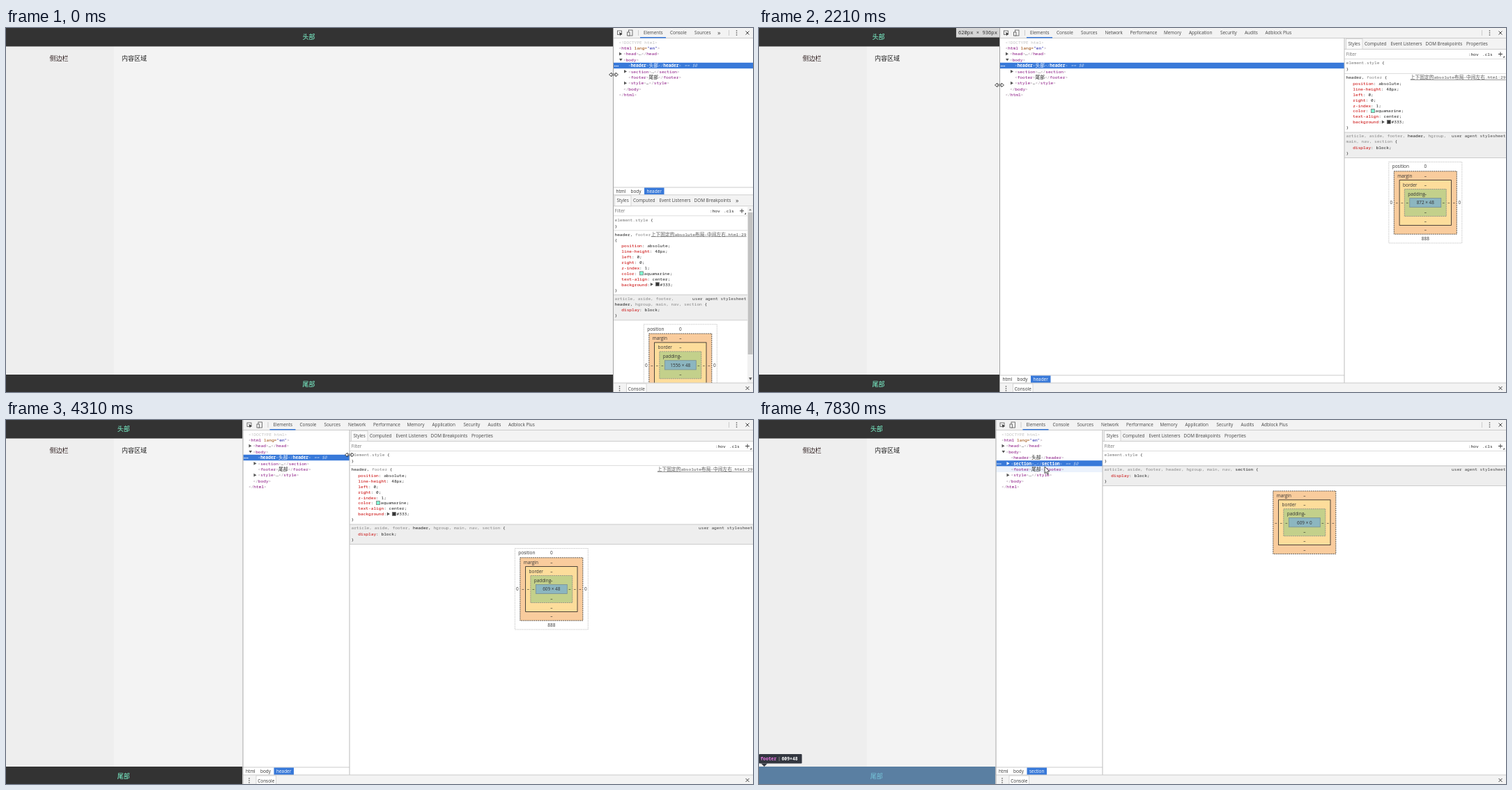
Recreate the animation shown at these times as an HTML page with a canvas. Size 1072x523 px, loop 8 s.

```html
<!DOCTYPE html>
<html lang="zh">
<head>
<meta charset="utf-8">
<title>DevTools resize</title>
<style>
html, body { margin: 0; width: 100%; height: 100%; overflow: hidden; background: #fff; }
canvas { display: block; width: 1072px; height: 523px; }
</style>
</head>
<body>
<canvas id="stage"></canvas>
<script>
const W = 1072, H = 523, LOOP = 8000;
const canvas = document.getElementById('stage');
const c = canvas.getContext('2d');
const ratio = window.devicePixelRatio || 1;
canvas.width = W * ratio;
canvas.height = H * ratio;

const MONO = '"Noto Sans Mono", "DejaVu Sans Mono", monospace';
const UI = '"Open Sans", "Noto Sans", sans-serif';
const CJK = '"Noto Sans CJK SC", "Noto Sans CJK", sans-serif';
const BLUE = '#3879d9', INK = '#222', GRAY = '#888', LINE = '#ccc', BAR = '#f3f3f3';
const ADVANCE = 3.69;

// Pointer: time, x, y
const POINTER = [
  [885, 872, 67], [1140, 842, 68], [1270, 756, 71], [1540, 495, 76], [1800, 400, 80],
  [2100, 345, 82], [2220, 345, 82], [2400, 339.5, 82], [2590, 339.5, 82], [2900, 470, 72],
  [3150, 680, 60], [3370, 838, 50], [3440, 839, 50], [3700, 839, 50], [3920, 575, 50],
  [4050, 520, 50], [4300, 493, 50], [4610, 493, 50], [4800, 512, 62], [5000, 500, 78],
  [5240, 505, 80], [5410, 539, 77], [5470, 539, 77], [5740, 587, 77], [5880, 587, 77],
  [6200, 480, 72], [6400, 420, 66], [6560, 407, 60], [6790, 407, 60], [7100, 500, 70],
  [7400, 430, 70], [7600, 416, 67], [7680, 416, 67], [7830, 410, 67]];
const DOCK = [[885, 871], [1270, 842], [1670, 492], [1930, 400], [2200, 345], [2260, 345], [2500, 339.5]];
const SPLIT = [[3710, 840], [3920, 588.5], [4060, 525], [4310, 493]];

const PANELS = [['Elements', 44], ['Console', 82], ['Sources', 117], ['Network', 151.5],
  ['Performance', 187.5], ['Memory', 236], ['Application', 272], ['Security', 317],
  ['Audits', 352], ['Adblock Plus', 381.5]];
const SIDE_TABS = [['Styles', 5.5], ['Computed', 29], ['Event Listeners', 66.5],
  ['DOM Breakpoints', 116.5], ['Properties', 175]];
// Tree rows: indent, fold arrow, markup
const TREE = [[8.5, '', '<!DOCTYPE html>'], [8.5, '', '<html lang="en">'], [15, 'right', '<head>…</head>'],
  [15, 'down', '<body>'], [22, '', '<header>头部</header>'], [22, 'right', '<section>…</section>'],
  [22, '', '<footer>尾部</footer>'], [22, 'right', '<style>…</style>'], [15, '', '</body>'], [8.5, '', '</html>']];
const RULES = ['position: absolute', 'line-height: 48px', 'left: 0', 'right: 0', 'z-index: 1',
  'color: aquamarine', 'text-align: center', 'background: #333'];
const SECTIONING = 'article, aside, footer, header, hgroup, main, nav, section';

function track(keys, t) {
  const next = keys.findIndex(k => k[0] > t);
  if (next === 0) return keys[0].slice(1);
  if (next < 0) return keys[keys.length - 1].slice(1);
  const a = keys[next - 1], b = keys[next], p = (t - a[0]) / (b[0] - a[0]);
  return a.slice(1).map((v, i) => v + (b[i + 1] - v) * p);
}

function rect(x, y, w, h, color) { c.fillStyle = color; c.fillRect(x, y, w, h); }
function hline(x, y, x2, color = LINE) { rect(x, y, x2 - x, 1, color); }
function vline(x, y, y2, color = LINE) { rect(x, y, 1, y2 - y, color); }

function frame(x, y, w, h, fill, stroke, dash = []) {
  if (fill) rect(x, y, w, h, fill);
  c.strokeStyle = stroke;
  c.lineWidth = 0.8;
  c.setLineDash(dash);
  c.strokeRect(x, y, w, h);
  c.setLineDash([]);
}

function poly(points, fill, stroke) {
  c.beginPath();
  points.forEach(([x, y]) => c.lineTo(x, y));
  c.closePath();
  if (fill) { c.fillStyle = fill; c.fill(); }
  if (stroke) { c.strokeStyle = stroke; c.lineWidth = 0.8; c.stroke(); }
}

function label(text, x, y, color = '#333', font = `6.4px ${UI}`, align = 'left') {
  c.font = font;
  c.textAlign = align;
  c.fillStyle = color;
  c.fillText(text, x, y + (font.startsWith('9') ? 3.2 : 2.3));
}

// Code text with wider Chinese glyphs; returns the end position.
function code(text, x, y, color = INK, bold = false, size = 6.15) {
  c.textAlign = 'left';
  c.fillStyle = color;
  for (const run of text.match(/[\u4e00-\u9fff]+|[^\u4e00-\u9fff]+/g)) {
    c.font = /[\u4e00-\u9fff]/.test(run) ? `6.72px ${CJK}` : `${bold ? 'bold ' : ''}${size}px ${MONO}`;
    c.fillText(run, x, y + 2.2);
    x += c.measureText(run).width;
  }
  return x;
}

function triangle(x, y, dir, color = '#555') {
  poly(dir === 'right' ? [[x, y - 2.4], [x + 4, y], [x, y + 2.4]]
    : dir === 'up' ? [[x, y + 1.2], [x + 4, y + 1.2], [x + 2, y - 1.2]]
    : [[x, y - 1.7], [x + 4.6, y - 1.7], [x + 2.3, y + 2]], color);
}

function dots(x, y, color = '#555') {
  for (const d of [-3, 0, 3]) rect(x - 0.7, y + d - 0.7, 1.4, 1.4, color);
}

function cross(x, y) {
  c.strokeStyle = '#444';
  c.lineWidth = 1;
  c.beginPath();
  c.moveTo(x - 2.5, y - 2.5); c.lineTo(x + 2.5, y + 2.5);
  c.moveTo(x + 2.5, y - 2.5); c.lineTo(x - 2.5, y + 2.5);
  c.stroke();
}

function drawPage(dock, hover) {
  const centered = (text, x, y, color) => label(text, x, y, color, `9px ${CJK}`, 'center');
  const mid = dock / 2 - 1, overlay = 'rgba(111,168,220,.66)';
  rect(0, 0, dock, H, '#f3f3f3');
  rect(0, 26, 154.5, 472, '#eee');
  centered('侧边栏', 76, 44, '#302020');
  label('内容区域', 166, 44, INK, `9px ${CJK}`);
  rect(0, 0, dock, 26.5, '#333');
  rect(0, 498, dock, 25, '#333');
  centered('头部', mid, 13, '#7fffd4');
  centered('尾部', mid, 512, '#7fffd4');
  if (hover === 'header') rect(0, 0, dock, 26.5, overlay);
  if (hover === 'footer') rect(0, 498, dock, 25, overlay);
  if (hover) drawNodeTip(hover);
}

function drawNodeTip(name) {
  const top = { header: 31, section: 4, footer: 480 }[name];
  const size = name === 'section' ? '609×0' : '609×48';
  const nameEnd = 2 + name.length * 3.84, bg = '#333740';
  const width = nameEnd + 13.5 + size.length * 3.84;
  c.fillStyle = bg;
  c.beginPath();
  c.roundRect(0, top, width, 13.5, 1);
  c.fill();
  if (name === 'footer') poly([[3, top + 13.5], [12, top + 13.5], [7.5, top + 18]], bg);
  else {
    poly([[3, top], [12, top], [7.5, top - 4]], bg);
    if (name === 'section') frame(0, top, width, 13.5, null, '#5a6472');
  }
  code(name, 2, top + 7, '#ee78e6', true, 6.4);
  vline(nameEnd + 3.5, top + 4, top + 10, '#888');
  code(size, nameEnd + 7.5, top + 7, '#fff', true, 6.4);
}

function drawSizeTip(dock) {
  const text = `${Math.round(609 + 1.78 * (dock - 339))}px × 936px`;
  c.font = `7.2px ${MONO}`;
  const width = c.measureText(text).width + 6;
  rect(dock - width, 0, width, 13.5, 'rgba(255,255,255,.8)');
  label(text, dock - width + 3, 7, '#333', `7.2px ${MONO}`);
}

function drawToolbar(dock) {
  rect(dock, 0, W - dock, 14, BAR);
  hline(dock, 14, W);
  frame(dock + 6.5, 4, 6, 5.5, null, '#555');
  poly([[dock + 9, 6], [dock + 13.5, 8.5], [dock + 11.5, 9], [dock + 10.5, 11.5]], '#333');
  frame(dock + 22.5, 3, 5.5, 8, null, '#555');
  frame(dock + 20.5, 6, 3.5, 5, BAR, '#555');
  vline(dock + 36, 3, 11);
  const room = W - 34 - dock;
  for (const [name, x] of PANELS) {
    c.font = `6.4px ${UI}`;
    if (x + c.measureText(name).width + 24 > room) {
      label('»', dock + x - 1.5, 6.5, '#444', `9px ${UI}`);
      break;
    }
    label(name, dock + x, 7, '#444');
  }
  rect(dock + 39, 13, 37, 1.5, BLUE);
  vline(1037, 3, 11);
  dots(1048.5, 7);
  cross(1064, 7);
}

function drawMarkup(markup, x, y, selected) {
  if (markup.startsWith('<!')) return code(markup, x, y, '#c0c0c0');
  const bracket = selected ? '#a9c8f2' : '#a894a6', pick = color => selected ? '#fff' : color;
  for (const token of markup.match(/<\/?\w+|>| \w+=|"\w+"|[^<>]+/g)) {
    if (token[0] === '<') {
      const [, open, name] = token.match(/(<\/?)(\w+)/);
      x = code(open, x, y, bracket);
      x = code(name, x, y, pick('#881280'), selected);
    } else if (token === '>') x = code(token, x, y, bracket);
    else x = code(token, x, y, pick(token[0] === ' ' ? '#994500' : token[0] === '"' ? '#1a1aa6' : INK));
  }
  return x;
}

function drawTree(dock, right, selected, focused, hoverRow) {
  TREE.forEach(([indent, fold, markup], i) => {
    const y = 20.4 + i * 8.4, current = i === selected, lit = current && focused;
    if (current) rect(dock + 1, y - 4.2, right - dock - 1, 8.4, focused ? BLUE : '#d4d4d4');
    else if (i === hoverRow) rect(dock + 1, y - 4.2, right - dock - 1, 8.4, '#ebf2fc');
    if (fold) triangle(dock + indent - 6, y, fold, lit ? '#fff' : '#555');
    const end = drawMarkup(markup, dock + indent, y, lit);
    if (!current) return;
    c.font = `italic 6.15px ${MONO}`;
    c.fillStyle = lit ? '#b5cdf0' : '#888';
    c.fillText('== $0', end + 4.5, y + 2.2);
    for (const d of [2, 4.3, 6.6]) rect(dock + d, y, 1.3, 1.3, lit ? '#fff' : '#666');
  });
}

function drawCrumbs(dock, right, y, name) {
  hline(dock, y - 1, right);
  label('html', dock + 4.5, y + 5.5);
  label('body', dock + 25.5, y + 5.5);
  rect(dock + 45, y, 28.5, 10.5, BLUE);
  label(name, dock + 59.2, y + 5.5, '#fff', `6.4px ${UI}`, 'center');
}

// Selector list whose first line leaves room for the text on the right.
function drawSelector(text, active, x, y, limit) {
  let cx = x;
  for (const word of `${text} {`.split(' ')) {
    if (cx + word.length * ADVANCE > limit) { cx = x; y += 8; limit = W; }
    const strong = word === '{' || word.replace(',', '') === active;
    cx = code(word, cx, y, strong ? INK : GRAY) + ADVANCE;
  }
  return y;
}

function drawProperty(text, x, y) {
  const [name, value] = text.split(': ');
  let end = code(name, x, y, '#c80000');
  end = code(':', end, y);
  if (name === 'background') { triangle(end + 1, y, 'right'); end += 4.5; }
  if (/color|background/.test(name)) {
    frame(end + 4, y - 2.6, 5, 5, name === 'color' ? '#7fffd4' : '#333', '#777');
    end += 6.5;
  }
  code(`${value};`, end + ADVANCE, y);
}

function drawCheckbox(x, y) {
  frame(x, y - 2.8, 5.6, 5.6, '#fff', '#888');
  c.strokeStyle = '#222';
  c.lineWidth = 1.2;
  c.beginPath();
  c.moveTo(x + 1, y); c.lineTo(x + 2.3, y + 1.6); c.lineTo(x + 4.8, y - 1.7);
  c.stroke();
}

function drawBoxModel(mid, top, size, positioned) {
  const LAYERS = [['margin', 45, 45.2, '#f9cc9d', '#333', [2, 1]], ['border', 37.2, 32.4, '#fddd9b', '#222', []],
    ['padding', 30, 19.5, '#c3d08b', '#888', [2, 1]]];
  const cy = top + 45.2 + (positioned ? 13.3 : 0);
  const dash = (x, y) => label('–', x, y, '#222', `6.4px ${UI}`, 'center');
  if (positioned) {
    frame(mid - 52.5, top, 105, 116.5, '#fff', '#bbb', [1.5, 1]);
    label('position', mid - 47.5, cy - 52);
    for (const [text, dx, dy] of [['0', 0, -52], ['0', -49, 0], ['0', 49, 0], ['888', 0, 52]])
      label(text, mid + dx, cy + dy, '#333', `6.4px ${UI}`, 'center');
  }
  LAYERS.forEach(([name, w, h, fill, stroke, pattern]) => {
    frame(mid - w, cy - h, w * 2, h * 2, fill, stroke, pattern);
    label(name, mid - w + 5, cy - h + 7);
    dash(mid, cy - h + 7);
    dash(mid, cy + h - 6.2);
  });
  frame(mid - 22.5, cy - 6.6, 45, 13.2, '#8cb6c0', '#7a8f94');
  for (const dx of [26, 33.5, 41]) { dash(mid - dx, cy); dash(mid + dx, cy); }
  label(size, mid, cy, '#333', `6.4px ${UI}`, 'center');
}

function drawStyles(x, narrow, section, hovered, size) {
  const dy = narrow ? 225.3 : 0, right = narrow ? 1064 : W;
  const linkEnd = right - (narrow ? 1.5 : 0.5);
  rect(x, 14 + dy, W - x, H - 14 - dy, '#fff');
  rect(x, 15 + dy, W - x, 15, BAR);
  hline(x, 14 + dy, W);
  hline(x, 30 + dy, W);
  frame(x + 2.5, 15.5 + dy, 23.5, 15, '#fafafa', LINE);
  for (const [name, tx] of SIDE_TABS) {
    if (name === 'Properties' && W - x < 222) label('»', x + 176, 22 + dy, '#444', `9px ${UI}`);
    else label(name, x + tx, 22.8 + dy, '#444');
  }
  label('Filter', x + 2.5, 37.6 + dy, '#777');
  code(':hov', right - 54, 37.6 + dy);
  code('.cls', right - 34, 37.6 + dy);
  rect(right - 11, 37 + dy, 6, 1, '#444');
  rect(right - 8.5, 34.5 + dy, 1, 6, '#444');
  poly([[right - 2, 40 + dy], [right - 2, 42.5 + dy], [right - 4.5, 42.5 + dy]], '#444');
  hline(x, 44 + dy, right, '#ddd');

  code('{', code('element.style ', x + 2.5, 50.2 + dy, '#777'), 50.2 + dy);
  code('}', x + 2.5, 59.2 + dy);
  hline(x, 65 + dy, right, '#ddd');
  let y = 71 + dy;
  if (!section) {
    const link = '上下固定的absolute布局-中间左右.html:29';
    const linkX = linkEnd - 11 * 6.72 - 17 * ADVANCE;
    code(link, linkX, y, '#555');
    rect(linkX, y + 3.2, linkEnd - linkX, 0.6, '#555');
    y = drawSelector('header, footer', 'header', x + 2.5, y, linkX) + 0.8;
    for (const rule of RULES) {
      y += 7.9;
      drawProperty(rule, x + 12.3, y);
      if (hovered) drawCheckbox(x + 3, y);
    }
    y += 8;
    code('}', x + 2.5, y);
    if (hovered) dots(1064.5, y - 1);
    y += 12;
  }
  const agentX = linkEnd - 21 * ADVANCE;
  const wraps = x + 2.5 + (SECTIONING.length + 2) * ADVANCE > agentX;
  const bottom = y + (wraps ? 31 : 23);
  rect(x, y - 5, right - x, bottom - y + 5, '#eee');
  hline(x, y - 5.5, right, LINE);
  code('user agent stylesheet', agentX, y, '#444');
  y = drawSelector(SECTIONING, section ? 'section' : 'header', x + 2.5, y, agentX) + 8.5;
  drawProperty('display: block', x + 12.3, y);
  code('}', x + 2.5, y + 8.2);
  hline(x, bottom, right);
  drawBoxModel((x + right) / 2 + 0.3, bottom + (section ? 8 : 6.5), size, !section);

  if (narrow) {
    rect(1064, 256, 8, 254, '#f1f1f1');
    rect(1064.7, 265, 6.8, 204, '#c1c1c1');
    triangle(1066, 261, 'up', '#888');
    triangle(1066, 504, 'down', '#555');
  }
}

function drawDrawer(dock) {
  rect(dock, 510, W - dock, 13, BAR);
  hline(dock, 509.5, W);
  dots(dock + 9.5, 518);
  frame(dock + 19.5, 511, 28.5, 14, '#fff', LINE);
  label('Console', dock + 21.8, 518.3);
  cross(1064, 517.5);
}

function drawPointer(x, y, resizing) {
  const half = [[-6.5, 0], [-3, -2.8], [-3, -0.9], [3, -0.9], [3, -2.8], [6.5, 0]];
  const shape = resizing
    ? [...half, ...half.slice(1, 5).reverse().map(([px, py]) => [px, -py])]
    : [[0, 0], [0, 9.5], [2.2, 7.5], [3.8, 11], [5.4, 10.3], [3.9, 6.9], [6.8, 6.7]];
  poly(shape.map(([px, py]) => [x + px, y + py]), '#fff', '#222');
}

function draw(t) {
  const [px, py] = track(POINTER, t), [dock] = track(DOCK, t), [split] = track(SPLIT, t);
  const narrow = dock > 690, section = t >= 6480;
  const resizing = t < 2600 || (t >= 3370 && t < 4620);
  const treeRight = narrow ? W : split;
  const row = !resizing && px > dock + 2 && px < treeRight ? Math.floor((py - 16.2) / 8.4) : -1;
  const hover = { 4: 'header', 5: 'section', 6: 'footer' }[row];
  const hoverRule = !section && !resizing && px > split && py > 66 && py < 150;
  const size = section ? '609 × 0' : `${t < 1600 ? 1556 : t < 2450 ? 872 : 609} × 48`;

  c.setTransform(ratio, 0, 0, ratio, 0, 0);
  rect(0, 0, W, H, '#fff');
  drawPage(dock, hover);
  if (t > 885 && t < 3300) drawSizeTip(dock);
  rect(dock, 0, W - dock, H, '#fff');
  drawToolbar(dock);
  drawTree(dock, treeRight, section ? 5 : 4, t < 4950 || section, row);
  drawCrumbs(dock, treeRight, narrow ? 229.5 : 499.5, section ? 'section' : 'header');
  drawStyles(narrow ? dock : split, narrow, section, hoverRule, size);
  if (!narrow) vline(split - 0.5, 14, 510, '#bbb');
  drawDrawer(dock);
  vline(dock, 0, H, '#a3a3a3');
  drawPointer(px, py, resizing);
}

const start = performance.now();
function tick() {
  draw((performance.now() - start) % LOOP);
  requestAnimationFrame(tick);
}
tick();
</script>
</body>
</html>
```
